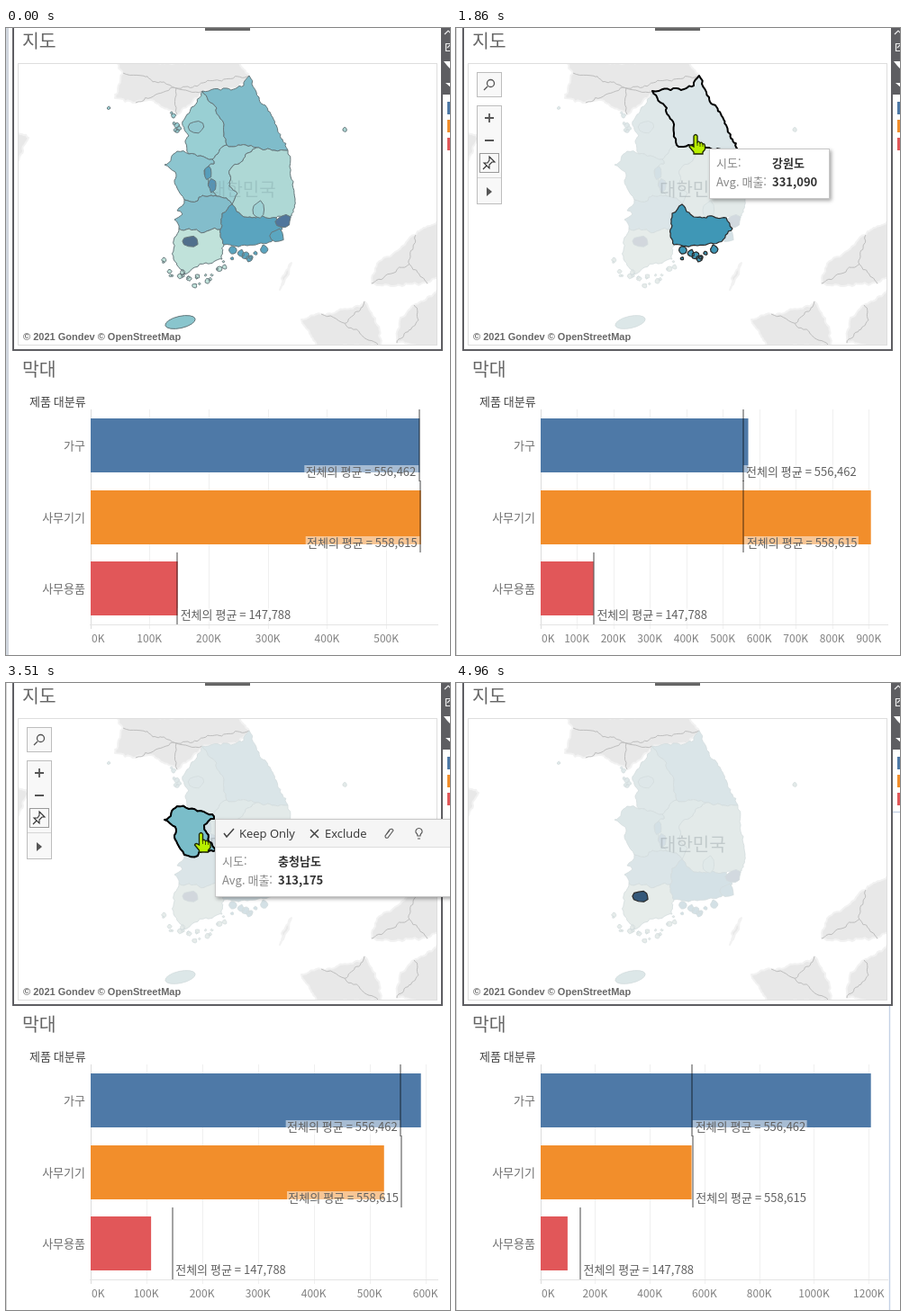
Recreate the animation shown at these times as an HTML page with a canvas. Size 493x697 px, loop 5930 ms.

```html
<!DOCTYPE html>
<html lang="ko">
<head>
<meta charset="utf-8">
<style>
html,body{margin:0;width:100%;height:100%;overflow:hidden;background:#fff}
canvas{display:block;width:493px;height:697px}
</style>
</head>
<body>
<canvas id="stage" width="493" height="697"></canvas>
<script>
const ctx = document.getElementById('stage').getContext('2d');
const LOOP = 5930, FIRST = 310, TICK = 110;
const KR = '"Noto Sans CJK KR","Noto Sans CJK","Noto Sans",sans-serif';

// ---------- map geometry ----------
const pts = s => s.split(' ').map(p => p.split(',').map(Number));
const noise = (x, y) => { const v = Math.sin(x * 12.9898 + y * 78.233) * 43758.5453; return v - Math.floor(v); };

// Midpoint displacement that ignores direction, so neighbours share a border.
function crinkle(a, b, out) {
  const dx = b[0] - a[0], dy = b[1] - a[1], len = Math.hypot(dx, dy);
  if (len < 4) { out.push(b); return; }
  const flip = a[0] > b[0] || (a[0] === b[0] && a[1] > b[1]) ? -1 : 1;
  const k = (noise(a[0] + b[0], a[1] + b[1]) - .5) * Math.min(.4, 4 / len) * flip;
  const m = [(a[0] + b[0]) / 2 - dy * k, (a[1] + b[1]) / 2 + dx * k];
  crinkle(a, m, out);
  crinkle(m, b, out);
}
function rough(list) {
  const out = [list[0]];
  for (let i = 1; i < list.length; i++) crinkle(list[i - 1], list[i], out);
  return out;
}
function trace(path, list, close) {
  list.forEach((p, i) => i ? path.lineTo(...p) : path.moveTo(...p));
  if (close) path.closePath();
  return path;
}
function blob(path, x, y, rx, ry = rx) {
  const list = [];
  for (let i = 0; i < 10; i++) {
    const q = .8 + .4 * noise(x + i, y), a = i * Math.PI / 5;
    list.push([x + q * rx * Math.cos(a), y + q * ry * Math.sin(a)]);
  }
  return trace(path, list, true);
}
// Islets strung along an arc
function islets(path, n, x, y, dx, dy, sag, r) {
  for (let i = 0; i < n; i++) {
    const u = i / (n - 1), j = noise(i, x);
    blob(path, x + dx * u + 6 * (j - .5), y + dy * u + sag * Math.sin(Math.PI * u) + 12 * (noise(i, y) - .5), r * (.5 + j));
  }
}

const borders = {
  A: '218,70 234,89 241,104 245,130',
  B: '245,130 266,130 278,133',
  C: '278,133 298,136 313,136',
  D: '218,70 245,67 264,64 270,53 281,77 300,108 313,136',
  E: '245,130 229,146',
  F: '229,146 216,142 203,140',
  G: '203,140 199,127 203,120 196,104 206,88 218,70',
  H: '229,146 231,151 220,158 225,176 234,187',
  I: '234,187 218,186 213,192 198,191',
  J: '198,191 190,178 188,160 176,152 190,137 203,140',
  K: '234,187 245,189 251,196',
  L: '251,196 257,184 248,176 249,157 278,133',
  N: '251,196 264,210 300,211',
  O: '300,211 317,209',
  Q: '317,209 321,190 316,165 313,136',
  R: '300,211 307,223 292,238',
  S: '292,238 268,242 242,241',
  T: '242,241 238,224',
  U: '251,196 240,206 238,224',
  V: '238,224 214,226 192,223',
  W: '192,223 187,213 196,207 190,203 198,191',
  X: '242,241 240,257 222,261 198,274 186,257 187,233 192,223'
};
function region(spec) {
  const list = spec.split(' ').flatMap(k => {
    const b = pts(borders[k[0]]);
    return rough(k[1] ? b.reverse() : b);
  });
  return trace(new Path2D(), list, true);
}
const city = (...a) => blob(new Path2D(), ...a);
const jeju = new Path2D();
jeju.ellipse(193.5, 327, 17, 6.6, -.22, 0, 7);

const regions = {
  gyeonggi: [region('A E F G'), '#8ac9ce'],
  gangwon: [region('D C- B- A-'), '#6bb3c3'],
  chungbuk: [region('E- B L- K- H-'), '#8fcacf'],
  chungnam: [region('F- H I J'), '#7abdc9'],
  gyeongbuk: [region('C Q- O- N- L'), '#a2d4d0'],
  jeonbuk: [region('I- K U V W'), '#70b4c4'],
  jeonnam: [region('V- T- X'), '#b7dfd6'],
  gyeongnam: [region('N R S T U-'), '#3f97b6'],
  jeju: [jeju, '#77bdc7'],
  seoul: [city(211, 110, 8, 6), '#81c1ca'],
  sejong: [city(224, 161, 4, 7), '#3b8eb1'],
  daejeon: [city(229, 175, 4, 7), '#3b83aa'],
  daegu: [city(280, 202, 7, 9), '#90cbcf'],
  busan: [city(301, 231, 8, 7), '#4199b7'],
  ulsan: [city(308, 215, 8.5, 7), '#34608d'],
  gwangju: [city(205.5, 237, 8.5, 5.5), '#34587a']
};
islets(regions.gyeonggi[0], 7, 185, 97, 6, 20, 0, 2);
islets(regions.jeonnam[0], 22, 174, 262, 70, 2, 18, 1.9);
islets(regions.gyeongnam[0], 8, 249, 251, 35, 0, 3, 3);
blob(regions.gyeongbuk[0], 376, 113, 2.2);
blob(regions.gyeonggi[0], 114, 89, 1.6);

const land = [
  '123,38 130,50 121,78 144,83 160,80 190,96 206,84 218,70 258,66 270,53 258,38',
  '10,117 25,122 19,136 10,152',
  '482,214 455,230 412,262 406,284 430,287 468,284 482,276',
  '328,324 350,318 385,312 398,304 412,330 416,354 344,356',
  '482,288 453,308 438,322 434,350 482,356',
  '317,261 308,285 304,291 306,278'
].map(s => {
  const key = pts(s), path = trace(new Path2D(), rough([...key, key[0]]), true), seams = new Path2D();
  const mid = [0, 1].map(i => key.reduce((sum, p) => sum + p[i], 0) / key.length);
  if (key.length > 4) key.forEach((p, i) => { if (i % 2) trace(seams, rough([mid, p])); });
  return { path, seams };
});

// ---------- story ----------
const K_AVG = [556.462, 558.615, 147.788];
const visits = [
  { id: 'gyeongnam', name: '경상남도', sum: '384,045', bars: [570, 906, 146], x: 248, y: 229, go: 310, at: 870, press: 1100, done: 1310, off: 1640 },
  { id: 'gangwon', name: '강원도', sum: '331,090', bars: [346, 574, 207], x: 266, y: 119, go: 1430, at: 1860, press: 2080, done: 2190, off: 2520 },
  { id: 'chungnam', name: '충청남도', sum: '313,175', bars: [592, 526, 109], x: 216.5, y: 167, w: 175, go: 2300, at: 2860, press: 3070, done: 3290, off: 4400 },
  { id: 'gwangju', bars: [1208, 553, 100], x: 207, y: 238, go: 3750, at: 4190, press: 4400, done: 4510, off: 4860 }
];
const LEAVE = 4860, HOVER_LEAD = 120;

function handAt(t) {
  if (t < FIRST + TICK || t >= LEAVE) return null;
  const snap = FIRST + Math.floor((t - FIRST) / TICK) * TICK;
  let x = 290, y = 355;
  for (const v of visits) {
    const u = Math.min(1, Math.max(0, (t >= v.at ? 1 : (snap - v.go) / (v.at - v.go))));
    x += (v.x - x) * u;
    y += (v.y - y) * u;
  }
  return [x, y];
}
function stateAt(t) {
  const hand = handAt(t);
  const s = { hand, tools: !!hand, strip: t < FIRST, edge: t >= LEAVE, bars: K_AVG };
  visits.forEach((v, i) => {
    const end = i < visits.length - 1 ? visits[i + 1].go + 150 : LEAVE;
    const over = t >= v.at - HOVER_LEAD;
    if (over && t < end) s.hover = v.id;
    if (t >= v.press && t < v.done) s.press = v.id;
    if (t >= v.done) { s.sel = v.id; s.bars = v.bars; }
    if (over && t < v.off && v.name) {
      const [x, y] = t < v.at ? hand : [v.x, v.y];
      s.tip = { v, x: Math.round(x + 15), y: Math.round(y + 15), w: t < v.done ? v.w || 134 : 300, menu: t >= v.done + TICK };
    }
  });
  return s;
}

// ---------- drawing ----------
function rect(x, y, w, h, c) { ctx.fillStyle = c; ctx.fillRect(x, y, w, h); }
function box(x, y, w, h, c) { ctx.strokeStyle = c; ctx.lineWidth = 1; ctx.strokeRect(x, y, w, h); }
function text(s, x, y, font, c, align = 'left') {
  ctx.font = font; ctx.fillStyle = c; ctx.textAlign = align; ctx.fillText(s, x, y);
}
function paint(path, fill, stroke, lw) {
  if (fill) { ctx.fillStyle = fill; ctx.fill(path); }
  if (stroke) { ctx.strokeStyle = stroke; ctx.lineWidth = lw; ctx.stroke(path); }
}
const draw = (d, stroke, lw, fill) => paint(new Path2D(d), fill, stroke, lw);
function mix(hex, base, k) {
  const ch = i => Math.round(parseInt(hex.substr(i, 2), 16) * k + base * (1 - k));
  return `rgb(${ch(1)},${ch(3)},${ch(5)})`;
}

function drawMap(s) {
  ctx.save();
  ctx.beginPath(); ctx.rect(14, 40, 465, 312); ctx.clip();
  ctx.lineJoin = 'round';
  for (const l of land) {
    paint(l.path, '#e8e8e8', '#f2f2f2', 2);
    paint(l.seams, null, '#bdbdbd', 1);
  }
  for (const [path, color] of Object.values(regions)) {
    if (s.sel) paint(path, mix(color, 238, .15), '#d3dcde', .8);
    else paint(path, mix(color, 240, .85), '#66777b', 1);
  }
  text('대한민국', 226, 187, '20px ' + KR, s.sel ? 'rgba(140,150,155,.38)' : 'rgba(110,145,150,.28)');
  for (const id of [s.sel, s.press]) if (id) paint(...regions[id], '#2b2b2b', 1.2);
  if (s.hover) paint(regions[s.hover][0], null, '#000', 2);
  text('© 2021 Gondev © OpenStreetMap', 19, 347, 'bold 11px "Liberation Sans",Arial,sans-serif', '#686868');
  ctx.restore();
}

function drawTools() {
  for (const [y, h] of [[49, 28], [86, 110]]) {
    rect(23, y, 28, h, '#f8f8f8');
    box(23.5, y + .5, 27, h - 1, '#bdbdbd');
  }
  draw('M42.5 61.5a4 4 0 1 1-8 0a4 4 0 1 1 8 0M35 65L31 69', '#555', 1.3);
  draw('M32 100h10M37 95v10M32 125h10', '#555', 1.8);
  box(26.5, 139.5, 21, 21, '#999');
  draw('M37 143l6 6h-3l-3 3v4l-6-6h4l2-3zM34 153l-4 4', '#333', 1.1);
  draw('M24 166.5h26', '#d5d5d5', 1);
  draw('M34 177v10l6-5z', null, 0, '#555');
}

function drawTip({ v, x, y, w, menu }) {
  const top = menu ? y - 31 : y;
  ctx.save();
  ctx.shadowColor = 'rgba(0,0,0,.35)'; ctx.shadowBlur = 4; ctx.shadowOffsetX = ctx.shadowOffsetY = 2;
  rect(x, top, w, y + 56 - top, '#fff');
  ctx.restore();
  if (menu) {
    const font = '13px "Open Sans","Noto Sans",sans-serif';
    rect(x, top, w, 31, '#f5f5f5');
    draw(`M${x} ${y + .5}h${w}`, '#ddd', 1);
    draw(`M${x + 10} ${y - 15}l3 4l8-9M${x + 106} ${y - 19}l9 9m0-9l-9 9`, '#444', 1.5);
    text('Keep Only', x + 27, y - 10, font, '#333');
    text('Exclude', x + 122, y - 10, font, '#333');
    draw(`M${x + 189} ${y - 12}l5-7q3-2 4 1l-6 8q-3 1-3-2l5-6`, '#555', 1.1);
    draw(`M${x + 225} ${y - 12}q0-2-2-4a3.6 3.6 0 1 1 7 0q-2 2-2 4zM${x + 225} ${y - 9}h3`, '#555', 1.1);
  }
  box(x + .5, top + .5, w - 1, y + 55 - top, '#c8c8c8');
  [['시도:', v.name], ['Avg. 매출:', v.sum]].forEach(([label, value], i) => {
    text(label, x + 8, y + 21 + i * 20.5, '13px ' + KR, '#888');
    text(value, x + 70, y + 21 + i * 20.5, 'bold 13px ' + KR, '#333');
  });
}

function drawHand([x, y]) {
  ctx.save();
  ctx.translate(x, y);
  draw('M-2 1Q0-2 2 1V8Q4 6 5 9Q7 7 8 10Q10 9 10.5 12V16L8 19V21H-2V19L-7 13Q-6 10-2 13Z', '#1c2400', 1.3, '#b9f000');
  draw('M2 8v4M5 9v4M8 10v3', '#3a4800', .9);
  ctx.restore();
}

function drawChart(bars) {
  const X0 = 93.5, top = Math.max(...bars), unit = 367.2 / top, step = top > 1000 ? 200 : 100;
  const names = ['가구', '사무기기', '사무용품'], colors = ['#4e79a7', '#f28e2b', '#e15759'];
  text('막대', 18, 387, '20.5px ' + KR, '#666');
  text('제품 대분류', 26, 420, '13px ' + KR, '#444');
  for (let k = 0; k * unit < 385; k += step) {
    const x = X0 + k * unit, align = !k ? 'left' : x > 470 ? 'right' : 'center';
    draw(`M${Math.round(x) + .5} 424V668`, k ? '#f0f0f0' : '#dcdcdc', 1);
    text(k + 'K', k ? x : 95, 683, '12px ' + KR, '#808080', align);
  }
  draw('M93 663.5H480', '#e4e4e4', 1);
  bars.forEach((v, i) => {
    const y = Math.round(434 + i * 79.5);
    rect(94, y, X0 + v * unit - 94, i < 2 ? 60 : 60, colors[i]);
    text(names[i], 88, y + 35, '13px ' + KR, '#707070', 'right');
  });
  K_AVG.forEach((v, i) => {
    const y = Math.floor(434 + i * 79.5), x = X0 + v * unit, right = x + 126 < 480;
    rect(right ? x : x - 128, y + 52, 127, 16, 'rgba(255,255,255,.5)');
    rect(Math.floor(x) - 1, y - 10, 2, 80, 'rgba(0,0,0,.36)');
    text('전체의 평균 = ' + (v * 1000).toLocaleString('en-US', { maximumFractionDigits: 0 }),
      right ? x + 3 : x - 4, y + 64, '13px ' + KR, '#606060', right ? 'left' : 'right');
  });
}

function drawFrame(s) {
  text('지도', 18, 22, '20.5px ' + KR, '#666');
  draw('M8 0V358H484V0', '#5e5e62', 2);
  box(13.5, 39.5, 465, 313, '#dedede');
  rect(0, 0, s.strip ? 3 : 1, 697, s.strip ? '#d0d6de' : '#d4d4d4');
  rect(221, 0, 50, 3, '#666');
  rect(484, 0, 9, 74, '#5e5e62');
  draw('M487 7l4-4l3 3M488.5 17.5h6v8h-6zM490 22l4-4', '#eee', 1.2);
  draw('M486 37h8v9l-4-4zM488 61h6v5z', null, 0, '#fff');
  ['#4e79a7', '#f28e2b', '#e15759'].forEach((c, i) => rect(490, 82 + i * 20, 3, 14, c));
  if (s.edge) draw('M481.5 359V697M485 143.5H493', '#c5d2e6', 1.4);
}

function render(t) {
  const s = stateAt(t % LOOP);
  rect(0, 0, 493, 697, '#fff');
  drawMap(s);
  drawChart(s.bars);
  drawFrame(s);
  if (s.tools) drawTools();
  if (s.tip) drawTip(s.tip);
  if (s.hand) drawHand(s.hand);
}
const start = performance.now();
(function loop() {
  render(performance.now() - start);
  requestAnimationFrame(loop);
})();
</script>
</body>
</html>
```
